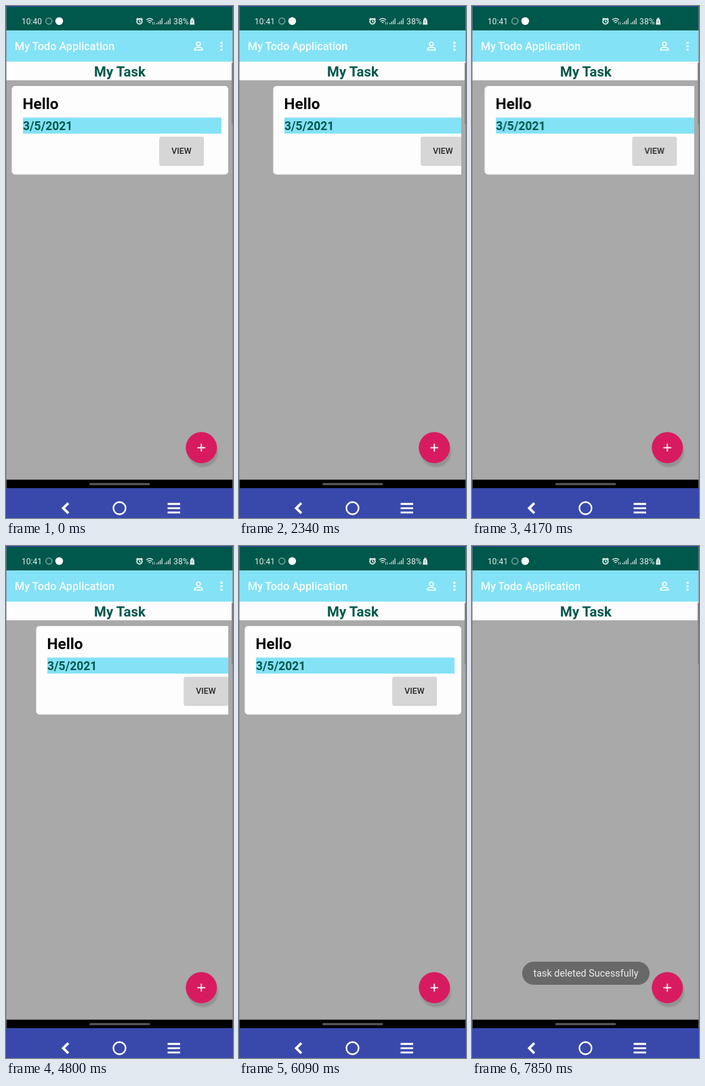
Write an HTML page that moves like this. It is 335 px wide and 755 px high and loops after 8 s.

```html
<!DOCTYPE html>
<html lang="en">
<head>
<meta charset="utf-8">
<title>Swipe to delete a task</title>
<style>
  html, body { margin: 0; width: 100%; height: 100%; overflow: hidden; background: #a9a9a9; }
  svg { display: block; width: 335px; height: 755px; font-family: Roboto, sans-serif; }
  .bold { font-weight: 700; }
  .medium { font-weight: 500; }
  .line { fill: none; stroke: #fff; }
  .card, .before, .after, .toast { animation: 8s step-end infinite; }
  .card { animation-name: swipe; }
  .before { animation-name: before; }
  .after { animation-name: after; }
  .toast { animation-name: toast; }

  /* three hesitant swipes, then the one that deletes */
  @keyframes swipe {
    0% { transform: translateX(0); }
    29.25% { transform: translateX(42px); }
    33% { transform: translateX(37px); }
    34.5% { transform: translateX(27px); }
    36% { transform: translateX(16.7px); }
    37.875% { transform: translateX(6px); }
    39.375% { transform: translateX(2px); }
    41.125% { transform: translateX(0); }
    52.125% { transform: translateX(10.3px); }
    53.625% { transform: translateX(17px); }
    55.125% { transform: translateX(23px); }
    57% { transform: translateX(33px); }
    58.5% { transform: translateX(38px); }
    60% { transform: translateX(36px); }
    61.875% { transform: translateX(16px); }
    63.75% { transform: translateX(5px); }
    65.25% { transform: translateX(1px); }
    67.125% { transform: translateX(0); }
    70.5% { transform: translateX(4px); }
    72.375% { transform: translateX(6px); }
    74.25% { transform: translateX(0); }
    84.625% { transform: translateX(213.7px); }
    86.125%, 100% { transform: translateX(330px); }
  }
  @keyframes before { 0% { opacity: 1; } 12.375%, 100% { opacity: 0; } }
  @keyframes after { 0% { opacity: 0; } 12.375%, 100% { opacity: 1; } }
  @keyframes toast { 0% { opacity: 0; } 88% { opacity: .6; } 89.5%, 100% { opacity: 1; } }
</style>
</head>
<body>
<svg viewBox="0 0 335 755">
  <defs>
    <clipPath id="list"><rect y="110" width="328" height="588"/></clipPath>
    <filter id="soft" x="-20%" y="-20%" width="140%" height="140%"><feGaussianBlur stdDeviation=".8"/></filter>
    <path id="bars" d="M.7 9V7M3.2 9V5M5.7 9V3M8.2 9V0" fill="none" stroke="#c4dbd7" stroke-width="1.3"/>
  </defs>

  <rect width="335" height="755" fill="#a9a9a9"/>

  <!-- status bar -->
  <rect width="335" height="36" fill="#00574b"/>
  <g fill="#e3efed" font-size="12">
    <text class="before" x="23" y="26.5">10:40</text>
    <text class="after" x="23" y="26.5">10:41</text>
    <text x="247" y="26.5" font-size="12.3">38%</text>
  </g>
  <circle cx="63.3" cy="22.3" r="4.5" fill="none" stroke="#76a59e" stroke-width="1.5"/>
  <circle cx="78.5" cy="22.3" r="5.7" fill="#fff"/>
  <g fill="none" stroke="#e6f1ef">
    <circle cx="197" cy="22.8" r="3.8" stroke-width="1.8"/>
    <path d="M192.3 20l2.5-2.3M201.7 20l-2.5-2.3M197 20.5v2.5l1.7 1" stroke-width="1.4"/>
    <path d="M207 20.5q5-4.2 10 0M208.8 22.7q3.2-2.6 6.4 0M210.6 24.7q1.4-1 2.8 0" stroke-width="1.3"/>
    <path d="M216.5 23.5v4M219 23.5v4" stroke="#b4d0cb"/>
  </g>
  <use href="#bars" x="222" y="18"/>
  <use href="#bars" x="234" y="18"/>
  <path d="M273.3 17.5h3v2h1.2l.8 8h-7l.8-8h1.2z" fill="#e3efed"/>
  <path d="M274.8 21v4" stroke="#5f958c"/>

  <!-- toolbar -->
  <rect y="36" width="335" height="46" fill="#84e2f6"/>
  <text class="medium" x="13" y="65.2" font-size="16.2" fill="#f8feff">My Todo Application</text>
  <g class="line" stroke-width="1.6">
    <circle cx="284" cy="56" r="2.8"/>
    <path d="M278.3 65v-1.2q0-2.8 5.7-2.8t5.7 2.8V65z"/>
  </g>
  <g fill="#fff">
    <circle cx="318" cy="54.2" r="1.7"/>
    <circle cx="318" cy="59.3" r="1.7"/>
    <circle cx="318" cy="64.4" r="1.7"/>
  </g>

  <rect y="82" width="335" height="27.5" fill="#fdfdfd"/>
  <text class="bold" x="168" y="104" font-size="20.4" text-anchor="middle" fill="#00574b">My Task</text>
  <rect x="333" y="84" width="2" height="90" fill="#858585"/>

  <!-- task -->
  <g clip-path="url(#list)">
    <g class="card">
      <rect x="8.5" y="118" width="319.5" height="130.5" rx="5" fill="#fdfdfd"/>
      <text class="bold" x="24.5" y="151.5" font-size="22.6" fill="#050505">Hello</text>
      <rect x="25" y="164.5" width="293" height="23.7" fill="#84e2f6"/>
      <text class="bold" x="25" y="183" font-size="17.5" fill="#00574b">3/5/2021</text>
      <rect x="226.5" y="194" width="65.5" height="41.5" rx="2.5" fill="#c2c2c2"/>
      <rect x="226.5" y="192.7" width="65.5" height="42" rx="2.5" fill="#d6d6d6"/>
      <text class="medium" x="259" y="218.2" font-size="12.4" text-anchor="middle" fill="#252525">VIEW</text>
    </g>
  </g>

  <g class="toast">
    <rect x="74" y="613" width="188" height="34" rx="17" fill="#686868"/>
    <text x="168" y="635" font-size="14.4" text-anchor="middle" fill="#ededed">task deleted Sucessfully</text>
  </g>

  <!-- add button -->
  <circle cx="290.5" cy="657.5" r="22.5" fill="#929292" filter="url(#soft)"/>
  <circle cx="288.3" cy="651.3" r="23" fill="#d81b60"/>
  <path class="line" d="M282.5 651.3h11.6M288.3 645.5v11.6" stroke-width="1.8"/>

  <!-- system bars -->
  <rect y="698.5" width="335" height="13" fill="#000"/>
  <rect x="123" y="703.5" width="89.5" height="3" rx="1.5" fill="#5c5c5c"/>
  <rect y="711" width="335" height="44" fill="#3949ab"/>
  <g class="line">
    <path d="M92 733l-7.5 7.5 7.5 7.5" stroke-width="3.8"/>
    <circle cx="167.5" cy="740.5" r="9" stroke-width="2.3"/>
    <path d="M238.5 734.3h18.5M238.5 740.6h18.5M238.5 746.9h18.5" stroke-width="2.9"/>
  </g>

  <path d="M.5 1v710M334.5 1v710" stroke="#80808a" stroke-opacity=".75"/>
  <rect width="335" height="1" fill="#3949ab"/>
</svg>
</body>
</html>
```
